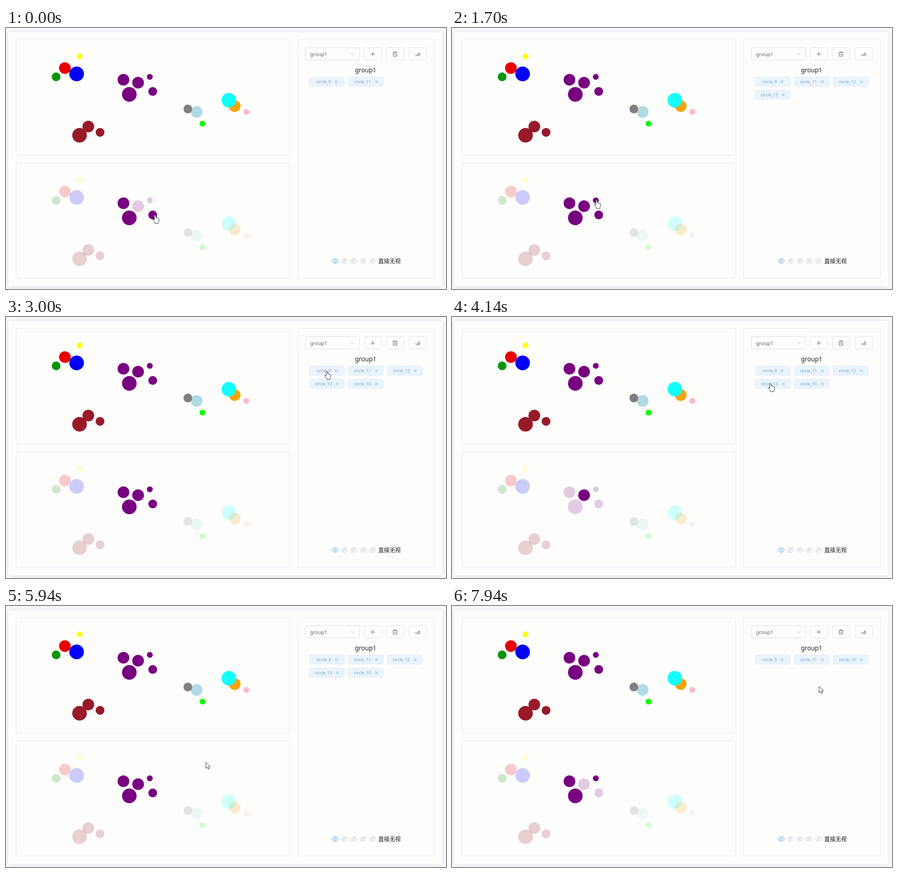
Recreate the animation shown at these times as an HTML page with a canvas. Size 971x577 px, loop 8 s.

```html
<!DOCTYPE html>
<html lang="zh">
<head>
<meta charset="utf-8">
<style>
html, body { margin: 0; width: 100%; height: 100%; overflow: hidden; background: #fbfbfd; }
canvas { display: block; width: 971px; height: 577px; }
</style>
</head>
<body>
<canvas id="stage" width="971" height="577"></canvas>
<script>
const ctx = document.getElementById('stage').getContext('2d');
const LOOP = 8000, HOVER_DELAY = 250, TAG_DELAY = 220, REST = 0.25;
const GRID = 6.46, LEFT = 65.4, TOP = 24, SHIFT = 273, DIM = 0.2;
const TAG_W = 77, TAG_H = 20;
const SANS = '"Noto Sans", "Open Sans", sans-serif';
const PURPLE = '#780080', BROWN = '#981a2a';

const dot = (x, y, r, color, id) =>
  ({ x: LEFT + x * GRID, y: TOP + y * GRID, r: r * GRID, color, id });

// grid x, y and radius
const circles = [
  dot(10, 10, 2, '#e80000'), dot(15, 6, 1, '#ffff0a'),
  dot(7, 13, 1.5, '#0a960a'), dot(14, 12, 2.5, '#0000f2'),
  dot(32, 19, 2.5, PURPLE, 9), dot(39, 13, 1, PURPLE, 10), dot(30, 14, 2, PURPLE, 11),
  dot(40, 18, 1.5, PURPLE, 12), dot(35, 15, 2, PURPLE, 13),
  dot(15, 33, 2.5, BROWN), dot(18, 30, 2, BROWN), dot(22, 32, 1.5, BROWN),
  dot(55, 25, 2, '#b0dae4'), dot(52, 24, 1.5, '#808080'), dot(57, 29, 1, '#0cff0c'),
  dot(68, 23, 2, '#fca304'), dot(66, 21, 2.5, '#14ffff'), dot(72, 25, 1, '#ffb8c6')
];

// when each circle is clicked into and out of the group
const members = [
  { id: 9, on: -LOOP, off: LOOP },
  { id: 11, on: -LOOP, off: LOOP },
  { id: 12, on: 0, off: 6850 },
  { id: 13, on: 820, off: 7300 },
  { id: 10, on: 1640, off: LOOP }
];

// pointer arrivals
const stops = [
  { t: 0, x: 329, y: 414 }, { t: 720, x: 294, y: 395 }, { t: 1600, x: 319, y: 381 },
  { t: 3000, x: 708, y: 120 }, { t: 3400, x: 787, y: 120 }, { t: 3650, x: 868, y: 120 },
  { t: 3900, x: 703, y: 147 }, { t: 4850, x: 783, y: 151 }, { t: 6300, x: 324, y: 412 },
  { t: 7150, x: 293, y: 395 }, { t: 7850, x: 810, y: 178 }
];

const icon = {
  hand: new Path2D('M-1.6 1.3Q-1.4-.3 0-.2Q1.5-.1 1.5 1.5V6Q3-.1 4.2 6.6Q5.9 5.5 6.4 7.3Q8.8 6.4 8.9 9V12Q8.5 14.2 7.3 15.5V18H-.2V16Q-2.1 14-4.4 10Q-4.7 8.3-3.1 8.6L-1.6 10.4Z'),
  arrow: new Path2D('M0 0V13.6L3.2 10.7L5.4 15.5L7.7 14.5L5.6 9.8H9.8Z'),
  eye: new Path2D('M-7.3 0Q0-11 7.3 0Q0 11-7.3 0ZM2.5 0A2.5 2.5 0 1 1-2.5 0A2.5 2.5 0 1 1 2.5 0'),
  slash: new Path2D('M-5.5 5.5L5.5-5.5'),
  chevron: new Path2D('M-4.3-2L0 2.3L4.3-2'),
  plus: new Path2D('M-5 0H5M0-5V5'),
  trash: new Path2D('M-5-3H5M-2-3V-5H2V-3M-4-3V5H4V-3M-1.3-.5V2.8M1.3-.5V2.8'),
  checks: new Path2D('M-6 .5L-3.2 3.5L4.3-4M1.5-1H5.5M-.5 1.3H5.5M-2.5 3.6H5.5'),
  close: new Path2D('M-2.8-2.8L2.8 2.8M2.8-2.8L-2.8 2.8')
};

function box(x, y, w, h, stroke, fill) {
  ctx.beginPath();
  ctx.roundRect(x, y, w, h, 3);
  if (fill) { ctx.fillStyle = fill; ctx.fill(); }
  ctx.strokeStyle = stroke;
  ctx.lineWidth = 1;
  ctx.stroke();
}

function text(str, x, y, font, color, align = 'left') {
  ctx.font = font;
  ctx.fillStyle = color;
  ctx.textAlign = align;
  ctx.fillText(str, x, y);
}

function drawIcon(path, x, y, stroke, fill, width = 1) {
  ctx.save();
  ctx.translate(x, y);
  if (fill) { ctx.fillStyle = fill; ctx.fill(path); }
  ctx.strokeStyle = stroke;
  ctx.lineWidth = width;
  ctx.lineJoin = 'round';
  ctx.stroke(path);
  ctx.restore();
}

// rest at a stop, then ease into the next one
function pointerAt(t) {
  const next = stops.find(s => s.t > t);
  if (!next) return stops[stops.length - 1];
  const from = stops[stops.indexOf(next) - 1];
  const p = Math.max(0, ((t - from.t) / (next.t - from.t) - REST) / (1 - REST));
  const s = p * p * (3 - 2 * p);
  return { x: from.x + (next.x - from.x) * s, y: from.y + (next.y - from.y) * s };
}

function tagsAt(t) {
  return members.filter(m => t >= m.on + TAG_DELAY && t < m.off).map((m, i) => ({
    id: m.id, x: 669.5 + (i % 3) * 86, y: 108.5 + Math.floor(i / 3) * 29
  }));
}

function tagUnder(t) {
  const { x, y } = pointerAt(Math.max(0, t));
  return tagsAt(t).find(g => x > g.x && x < g.x + TAG_W && y > g.y && y < g.y + TAG_H);
}

function drawPanels() {
  const edge = '#e6e8f3';
  ctx.fillStyle = '#fbfbfd';
  ctx.fillRect(0, 0, 971, 577);
  ctx.save();
  ctx.shadowColor = 'rgba(0,0,30,.12)';
  ctx.shadowBlur = 11;
  ctx.shadowOffsetY = 1;
  ctx.fillStyle = '#fdfdfc';
  ctx.fillRect(5, 8, 958, 563);
  ctx.restore();
  box(4.5, 8.5, 959, 563, '#ebecf3', '#fdfdfc');
  box(22.5, 25.5, 603, 255, edge);
  box(22.5, 298.5, 603, 254.5, edge);
  box(643.5, 25.5, 302, 527.5, edge);
}

function drawToolbar() {
  box(660.5, 43.5, 120, 27, '#d9dbe1');
  text('group1', 671, 62, '11.1px ' + SANS, '#606266');
  drawIcon(icon.chevron, 764.8, 57.5, '#b4b7be');
  [icon.plus, icon.trash, icon.checks].forEach((path, i) => {
    const x = 790.5 + i * 49.3;
    box(Math.floor(x) + 0.5, 43.5, 38.5, 27, '#dfe1e6');
    drawIcon(path, Math.floor(x) + 19.5, 57.5, '#6a6b6e');
  });
  text('group1', 793.6, 98, '13.8px ' + SANS, '#1f2022', 'center');
}

function drawTag({ id, x, y }) {
  const mid = x + TAG_W / 2 + 0.3, half = id < 10 ? 23.3 : 26.4;
  box(x, y, TAG_W, TAG_H, '#d8eaf9', '#eaf4fc');
  text('circle_' + id, mid - half, y + 13.8, '300 9.3px ' + SANS, '#6f9dc6');
  drawIcon(icon.close, mid + half - 3.2, y + 10.3, '#5ba5de');
}

function drawLegend() {
  for (let i = 0; i < 5; i++) {
    const x = 726.3 + i * 20.7, y = 515.2, color = i ? '#c2c3c6' : '#459fdd';
    drawIcon(icon.eye, x, y, color);
    if (!i) continue;
    drawIcon(icon.slash, x + 1, y + 1, '#fdfdfc', null, 1.6);
    drawIcon(icon.slash, x, y, color);
  }
  text('直接无视', 821.8, 519.8, '12.3px "Noto Sans CJK SC", "Noto Sans CJK", sans-serif', '#111');
}

function drawCircles(dy, alphaOf) {
  for (const { x, y, r, color, id } of circles) {
    ctx.globalAlpha = alphaOf(id);
    ctx.fillStyle = color;
    ctx.beginPath();
    ctx.arc(x, y + dy, r, 0, 2 * Math.PI);
    ctx.fill();
  }
  ctx.globalAlpha = 1;
}

function drawPointer(t) {
  const { x, y } = pointerAt(t);
  const onCircle = circles.some(c => Math.hypot(x - c.x, y - c.y - SHIFT) < c.r);
  drawIcon(onCircle || tagUnder(t) ? icon.hand : icon.arrow, x, y, '#30303a', '#fff');
}

function render(t) {
  const hover = tagUnder(t - HOVER_DELAY);
  const lit = hover ? [hover.id] : members.filter(m => t >= m.on && t < m.off).map(m => m.id);
  drawPanels();
  drawToolbar();
  tagsAt(t).forEach(drawTag);
  drawLegend();
  drawCircles(0, () => 1);
  drawCircles(SHIFT, id => lit.includes(id) ? 1 : DIM);
  drawPointer(t);
}

const start = performance.now();
function tick() {
  render((performance.now() - start) % LOOP);
  requestAnimationFrame(tick);
}
tick();
</script>
</body>
</html>
```
